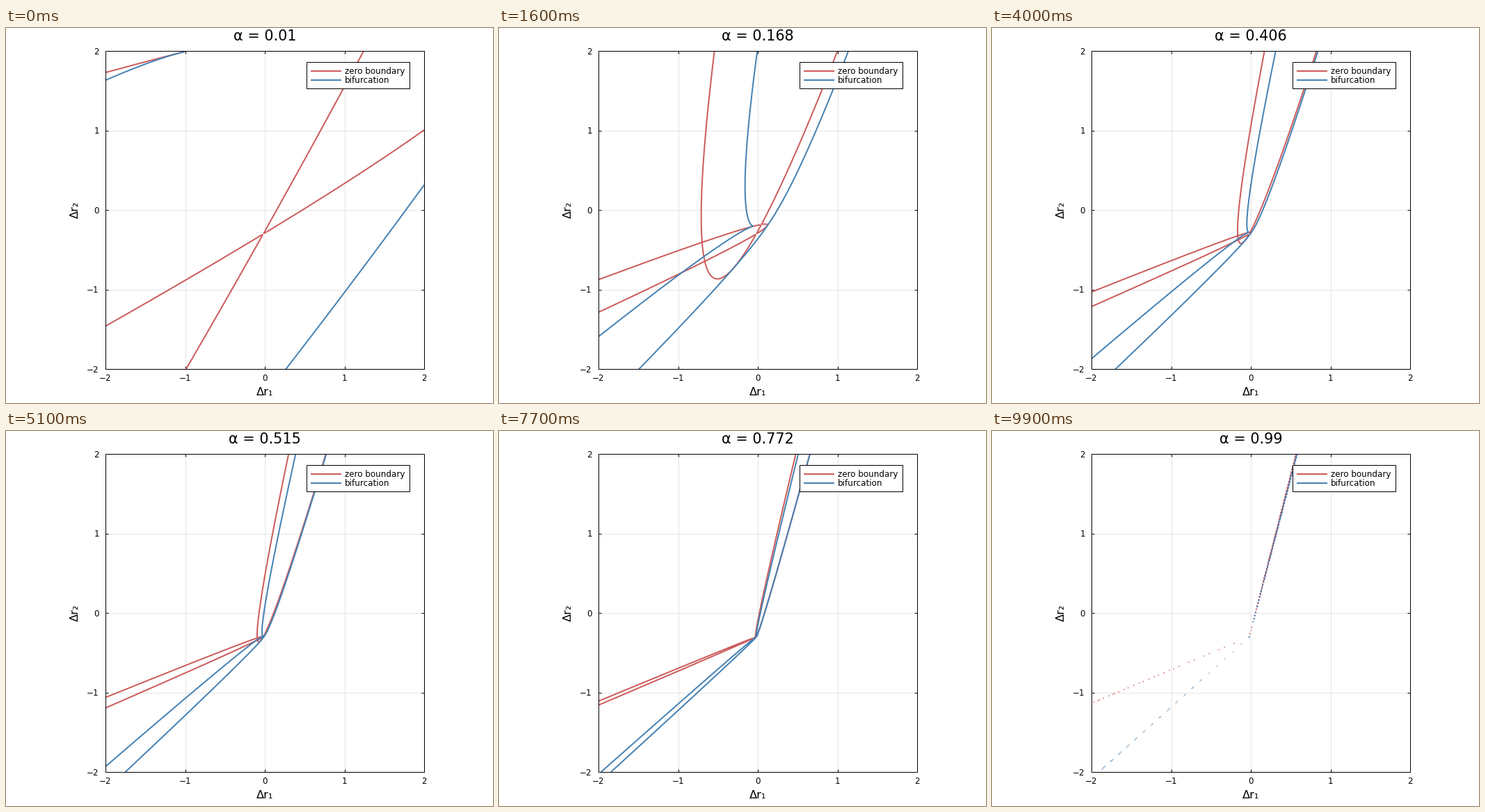
A matplotlib script for the animation above (10000 ms loop, 700 by 540 pixels).

```python
import numpy as np
import matplotlib.pyplot as plt
from matplotlib.animation import FuncAnimation
from matplotlib.patches import Rectangle
from numpy.polynomial import Polynomial

W, H, DPI = 700, 540, 100
PX = 72 / DPI
RED, BLUE = "#cd5c5c", "#4682b4"
FRAMES = 100
ALPHAS = np.linspace(0.01, 0.99, FRAMES)
plt.rcParams["font.family"] = "DejaVu Sans"

# Equilibria of  r = r0 + (1-a)(u1 x + u2 y) + a(v1 x^2 + c x y + v2 y^2)
# with c = DELTA*v1 + GAMMA*v2.
R0 = np.array([-0.02, -0.30])
U1, U2 = np.array([0.373, 0.2263]), np.array([0.4153, 0.742])
V1, V2 = np.array([-1.0, -0.4206]), np.array([0.2565, 1.0])
DELTA, GAMMA = 0.152, -1.677

# Work in the basis (v1, v2)
BASIS = np.linalg.inv(np.column_stack([V1, V2]))
(A1, A2), (B1, B2) = BASIS @ U1, BASIS @ U2

axis = np.linspace(-2, 2, 401)
gx, gy = np.meshgrid(axis, axis)
dx, dy = gx - R0[0], gy - R0[1]
XI = BASIS[0, 0] * dx + BASIS[0, 1] * dy
ETA = BASIS[1, 0] * dx + BASIS[1, 1] * dy

# Pencil of the two equilibrium conics
lam = Polynomial([0, 1])
h = Polynomial([DELTA, GAMMA]) / 2
g = Polynomial([A1, A2]) / 2
f = Polynomial([B1, B2]) / 2
Q = (lam - h * h).coef
REST = (2 * h * g * f - f * f - lam * g * g).coef


def zero_boundary(xi, eta):
    """Product of the curves on which one species vanishes."""
    s, t = eta / A2, xi / B1
    return (xi - s * s - A1 * s) * (eta - t * t - B2 * t)


def bifurcation(xi, eta):
    """Discriminant of the pencil: zero where two equilibria merge."""
    c0 = REST[0] - Q[0] * xi
    c1 = REST[1] - Q[1] * xi - Q[0] * eta
    c2 = REST[2] - Q[2] * xi - Q[1] * eta
    c3 = REST[3] - Q[2] * eta
    p, q = c3 * c0, c2 * c1
    return (18 * p * q - 4 * c2 * c2 * c2 * c0 + q * q
            - 4 * c3 * c1 * c1 * c1 - 27 * p * p)


fig = plt.figure(figsize=(W / DPI, H / DPI), dpi=DPI, facecolor="white")

L, R, T, B = 143, 601, 33.4, 491.2
ax = fig.add_axes([L / W, 1 - B / H, (R - L) / W, (B - T) / H])
ax.set(xlim=(-2, 2), ylim=(-2, 2), xticks=range(-2, 3), yticks=range(-2, 3))
ax.set_axisbelow(True)
ax.grid(color="black", alpha=0.1, lw=PX)
ax.tick_params(direction="in", length=4 * PX, width=PX, top=True, right=True,
               labelbottom=False, labelleft=False)
for spine in ax.spines.values():
    spine.set_linewidth(PX)

# Overlay in pixel coordinates, y downwards
page = fig.add_axes([0, 0, 1, 1], zorder=2)
page.set(xlim=(0, W), ylim=(H, 0))
page.axis("off")


def label(x, y, text, size, ha="center", **kw):
    return page.text(x, y, text, fontsize=size * PX, ha=ha, va="baseline", **kw)


SMALL, GUIDE, TITLE = 11.85, 16.3, 20.8
for v in range(-2, 3):
    name = str(v).replace("-", "\u2212")
    label(372 + 114.5 * v, 507.8, name, SMALL)
    label(133.8, 266.6 - 114.45 * v, name, SMALL, ha="right")
label(372, 529, "Δr₁", GUIDE)
label(103.8, 262, "Δr₂", GUIDE, rotation=90, rotation_mode="anchor")
title = label(372, 18.4, "", TITLE)

page.add_patch(Rectangle((431.5, 48.5), 148, 38.5, fc="white", ec="black", lw=PX))
for y, color, name in ((61.5, RED, "zero boundary"), (74.5, BLUE, "bifurcation")):
    page.plot([438, 481.5], [y, y], color=color, lw=2 * PX,
              solid_capstyle="butt")
    label(487, y + 4.3, name, SMALL, ha="left")

curves = []


def draw(i):
    while curves:
        curves.pop().remove()
    a = ALPHAS[i]
    k = a / (1 - a) ** 2
    xi, eta = k * XI, k * ETA
    for func, color in ((zero_boundary, RED), (bifurcation, BLUE)):
        curves.append(ax.contour(axis, axis, func(xi, eta), levels=[0],
                                 colors=color, linewidths=2 * PX))
    title.set_text(f"α = {round(a, 3):g}")
    return [title]


anim = FuncAnimation(fig, draw, frames=FRAMES, interval=100, repeat=True,
                     repeat_delay=0, blit=False)
plt.show()
```
